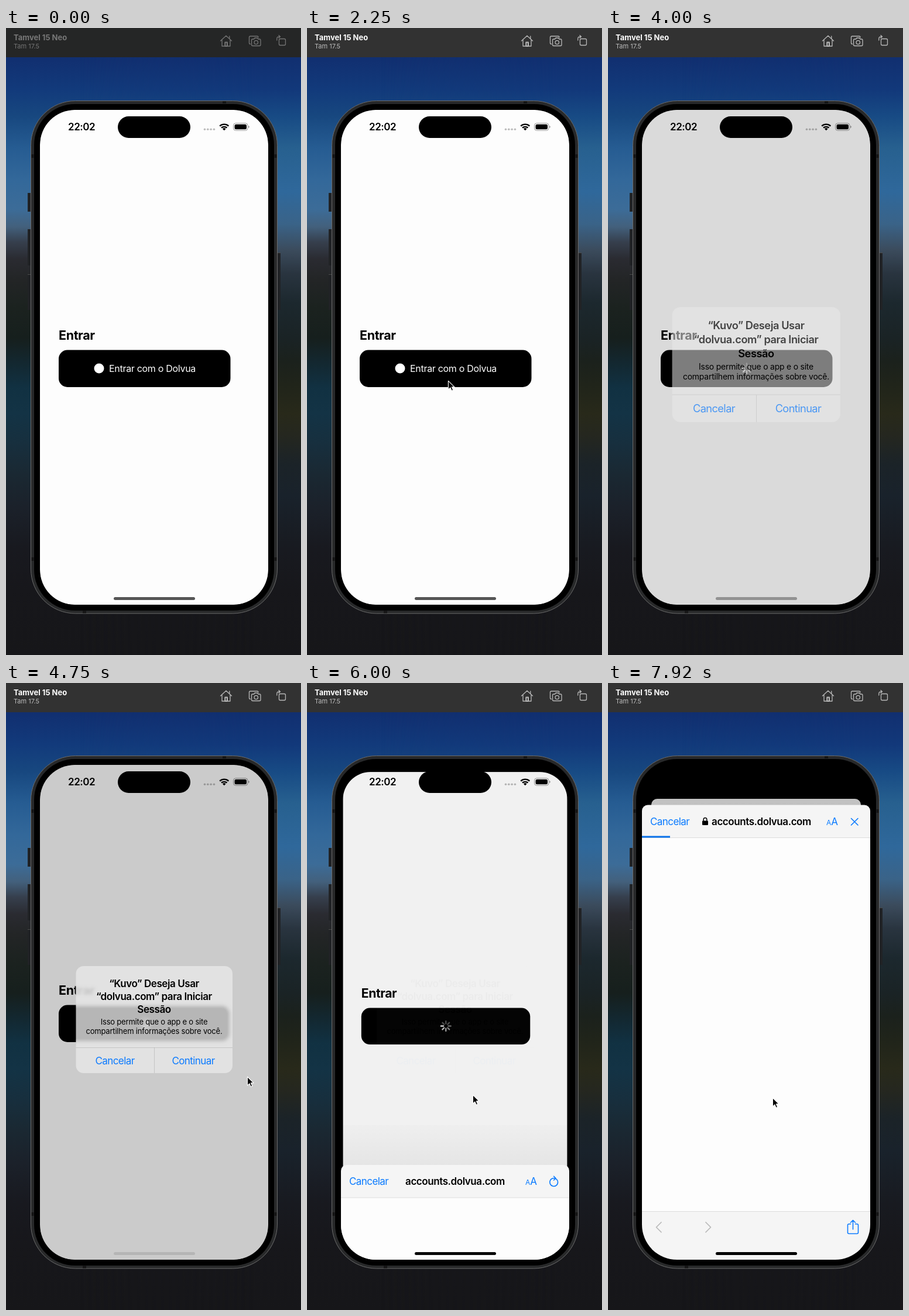
An HTML page for the animation above (8000 ms loop, 504 by 1072 pixels).

```html
<!DOCTYPE html>
<html lang="pt">
<head>
<meta charset="utf-8">
<title>Entrar</title>
<style>
  html, body { margin: 0; width: 100%; height: 100%; overflow: hidden; background: #17171b; }
  #wall, #wall::after, svg { position: absolute; inset: 0; width: 100%; height: 100%; display: block; }
  #wall {
    background: linear-gradient(#112f70 50px, #123a7b 105px, #17477f 150px, #265c92 205px, #33689a 260px,
      #3c6c98 310px, #43607c 340px, #363f4d 366px, #2a2b31 395px, #232526 430px, #1b221f 480px, #161f1d 530px,
      #13272f 570px, #113142 615px, #133345 660px, #172f3e 710px, #1a2832 765px, #1b212a 820px, #18191f 890px,
      #17171b 960px, #161619);
  }
  #wall::after {
    content: "";
    background: linear-gradient(#112f70 50px, #12387a 105px, #174a84 150px, #27608f 205px, #2f689b 280px,
      #3a6388 335px, #3b4b5c 380px, #29343f 420px, #1c282e 470px, #1a2325 530px, #1b211c 570px, #20241a 610px,
      #28291a 660px, #25271f 695px, #1b2328 745px, #19222b 800px, #181a20 890px, #17171b 960px, #161619);
    -webkit-mask-image: linear-gradient(90deg, transparent 25%, #000 85%);
    mask-image: linear-gradient(90deg, transparent 25%, #000 85%);
  }
  text { font-family: Inter, "Open Sans", sans-serif; font-size: 17px; }
  .semi { font-weight: 600; letter-spacing: -.43px; }
  .link { fill: #0a7aff; letter-spacing: -.58px; }
  .small { font-size: 13px; letter-spacing: -.2px; }
  .mid { text-anchor: middle; }
  .line { fill: none; stroke-linecap: round; stroke-linejoin: round; }
  .blue { stroke: #0a7aff; stroke-width: 1.6; }
</style>
</head>
<body>
<div id="wall"></div>
<svg viewBox="0 0 504 1072" preserveAspectRatio="none">
  <defs>
    <clipPath id="screen"><rect x="58" y="140" width="390" height="846" rx="60"/></clipPath>
    <clipPath id="panel"><rect x="119.5" y="484" width="267.5" height="183" rx="13"/></clipPath>
    <clipPath id="card"><rect id="cardRect" x="58" y="140" width="390" height="846"/></clipPath>
    <filter id="blur"><feGaussianBlur stdDeviation="2.5"/></filter>
    <linearGradient id="shade" x2="0" y2="1">
      <stop stop-opacity=".01"/><stop offset="1" stop-opacity=".055"/>
    </linearGradient>
  </defs>

  <!-- window bar -->
  <rect id="bar" width="504" height="50"/>
  <text id="device" x="13" y="21" style="font-size:13px;font-weight:700">Tamvel 15 Neo</text>
  <text id="system" x="13" y="35" style="font-size:11px">Tam 17.5</text>
  <g id="tools" class="line" stroke-width="1.3">
    <path d="M366.5 22 376 13.2 385.500 22M369 20V31H383V20M381.800 18V14"/>
    <path d="M374.300 31V24.500H378V31Z" stroke-width="2"/>
    <path d="M417.500 27.500Q415.500 27.500 415.500 25.500V16Q415.500 14 417.500 14H429Q431 14 431 16"/>
    <path d="M421.500 19H423.500L425 17H429.500L431 19H433Q435 19 435 21V28.500Q435 30.500 433 30.500H421.500Q419.500 30.500 419.500 28.500V21Q419.500 19 421.500 19Z"/>
    <circle cx="427.300" cy="24.500" r="3.200"/>
    <rect x="466.500" y="18.500" width="11" height="11" rx="2"/>
    <path d="M462.800 21V18.500Q462.800 14.800 466.500 14.800H468M466 12.500 468.500 14.800 466 17"/>
  </g>

  <!-- phone body -->
  <g fill="#202225">
    <path d="M37 282h6v32h-6zM37 344h6v62h-6zM37 421h6v61h-6zM463 384h6v98h-6z"/>
  </g>
  <path d="M37 421.500H43M463 384.500H469" stroke="#4a4a4a"/>
  <rect x="42.500" y="124.500" width="421" height="876.500" rx="76" fill="#28292a" stroke="#6a6a6a"/>
  <path d="M370 127h6M131 998.500h6M45.500 216v6M460.500 216v6M45.500 905v6M460.500 905v6" stroke="#151515" stroke-width="4"/>
  <rect x="48" y="130" width="410" height="866" rx="70"/>

  <g clip-path="url(#screen)">
    <g id="page">
      <g clip-path="url(#card)">
        <rect x="58" y="140" width="390" height="846" fill="#fdfdfd"/>
        <text x="90" y="533" style="font-size:21.5px;font-weight:700;letter-spacing:-.4px">Entrar</text>
        <rect x="90" y="550.500" width="293.500" height="63.500" rx="15"/>
        <g id="label" fill="#fff">
          <circle cx="159" cy="582" r="8.500"/>
          <text x="176" y="588" style="font-size:16px;letter-spacing:-.3px">Entrar com o Dolvua</text>
        </g>
        <g id="spinner" class="line" stroke="#fff" stroke-width="2.400"></g>
        <rect id="dim" x="58" y="140" width="390" height="846"/>
      </g>
    </g>

    <g id="status">
      <text class="semi" x="106" y="175">22:02</text>
      <g fill-opacity=".26">
        <circle cx="339.500" cy="173.200" r="1.800"/><circle cx="344.800" cy="173.200" r="1.800"/>
        <circle cx="350.100" cy="173.200" r="1.800"/><circle cx="355.400" cy="173.200" r="1.800"/>
      </g>
      <path class="line" style="stroke-linecap:butt" d="M365.200 167.600A11 11 0 0 1 380.300 167.600M368 170.700A7 7 0 0 1 377.500 170.700" stroke="#000" stroke-width="2.400"/>
      <path d="M372.750 175.200 370 172.400A4 4 0 0 1 375.500 172.400Z"/>
      <rect x="388.500" y="162.800" width="24.500" height="12.400" rx="4" fill="none" stroke="#000" stroke-opacity=".4"/>
      <rect x="390.500" y="164.800" width="20.500" height="8.400" rx="2.500"/>
      <path d="M414.200 167v4q1.600-.6 1.600-2t-1.600-2" fill-opacity=".4"/>
    </g>
    <rect x="191" y="151" width="124" height="37" rx="18.500"/>

    <g id="frost" clip-path="url(#panel)"><use href="#page" filter="url(#blur)"/></g>
    <g id="alert">
      <rect x="119.500" y="484" width="267.500" height="183" rx="13" fill="#e8e8e8" fill-opacity=".783"/>
      <path d="M119.500 623.500H387M253.500 623.500V667" stroke="#000" stroke-opacity=".13"/>
      <g class="mid">
        <text class="semi" x="253" y="519.500">“Kuvo” Deseja Usar</text>
        <text class="semi" x="253" y="541.500">“dolvua.com” para Iniciar</text>
        <text class="semi" x="253" y="563.500">Sessão</text>
        <text class="small" x="253" y="583.500">Isso permite que o app e o site</text>
        <text class="small" x="253" y="599.500">compartilhem informações sobre você.</text>
        <text class="link" x="186" y="651.500">Cancelar</text>
        <text class="link" x="320" y="651.500">Continuar</text>
      </g>
    </g>

    <g id="sheet">
      <rect x="58" y="140" width="390" height="78" fill="url(#shade)"/>
      <rect x="58" y="208.500" width="390" height="800" rx="10" fill="#f5f5f5"/>
      <rect x="58" y="264" width="390" height="640" fill="#fdfdfd"/>
      <path d="M58 264.500H448M58 903.500H448" stroke="#dcdcdc"/>
      <text class="link" x="72" y="242.500">Cancelar</text>
      <text id="site" class="semi mid" x="253" y="242.500">accounts.dolvua.com</text>
      <text x="373" y="242.500" fill="#0a7aff" style="font-size:12px">A</text>
      <text x="381.300" y="242.500" fill="#0a7aff">A</text>
      <path id="reload" class="line blue" d="M425.500 232.400A6.900 6.900 0 1 1 420.500 231.300H424.500M421.600 228 425 231.300 421.600 234.600"/>
      <g id="loading">
        <path class="line blue" d="M415.500 231.500 427 243M427 231.500 415.500 243"/>
        <rect x="161" y="235.500" width="10" height="7.500" rx="1.300"/>
        <path class="line" d="M163.200 236V233.300A2.800 2.800 0 0 1 168.800 233.300V236" stroke="#000" stroke-width="1.500"/>
        <rect id="progress" x="58" y="261.500" height="3" fill="#0a72ea"/>
      </g>
      <path class="line" d="M91 922 82.500 930.500 91 939M167 922 175.500 930.500 167 939" stroke="#b9b9b9" stroke-width="1.700"/>
      <path class="line blue" d="M414.500 925H411.500Q409.500 925 409.500 927V939.500Q409.500 941.500 411.500 941.500H425.500Q427.500 941.500 427.500 939.500V927Q427.500 925 425.500 925H422.500M418.500 934V919M414.500 922.500 418.500 918.500 422.500 922.500"/>
    </g>
    <rect id="home" x="184" y="973" width="139" height="5" rx="2.500"/>
  </g>

  <path id="cursor" d="M.4.300V15.200L3.900 11.900 6.200 17.300 8.700 16.200 6.400 10.900H11Z" stroke="#fff" stroke-width="1.100" stroke-linejoin="round"/>
</svg>
<script>
const LOOP = 8000, FPS = 12;
const ACTIVE = 1830, TAP = 2660, ALERT = 3850, ACCEPT = 5790, SHEET = 5953.5, LOAD = 7400;

// time, x, y of the pointer tip
const POINTER = [
  [400, 300, 1085], [900, 262, 700], [1500, 241, 603], [2750, 241, 603], [3300, 520, 640],
  [4450, 520, 690], [5000, 330, 660], [5300, 307, 649], [5800, 307, 649], [6000, 283, 704], [6200, 281, 709]
];
const HOME = [[3830, .66], [4000, .33], [4300, .11], [5790, .11], [6000, .97], [6080, 1]];

const el = {};
document.querySelectorAll('svg [id]').forEach(n => el[n.id] = n);
const set = (id, attrs) => { for (const k in attrs) el[id].setAttribute(k, attrs[k]); };
const show = (id, on) => set(id, { visibility: on ? 'visible' : 'hidden' });
const clamp = v => Math.min(1, Math.max(0, v));
const mix = (a, b, p) => a + (b - a) * p;

function spring(ms, rate) {
  const x = Math.max(0, ms) * rate / 1000;
  return x > 9 ? 1 : 1 - Math.exp(-x) * (1 + x);
}

function track(keys, t, i, ease = p => p) {
  if (t <= keys[0][0]) return keys[0][i];
  for (let k = 1; k < keys.length; k++) {
    const a = keys[k - 1], b = keys[k];
    if (t <= b[0]) return mix(a[i], b[i], ease((t - a[0]) / (b[0] - a[0])));
  }
  return keys[keys.length - 1][i];
}
const smooth = p => p * p * (3 - 2 * p);

for (let i = 0; i < 8; i++) {
  const spoke = document.createElementNS('http://www.w3.org/2000/svg', 'path');
  spoke.setAttribute('d', 'M237 577.700V573.500');
  spoke.setAttribute('transform', `rotate(${i * 45} 237 582)`);
  el.spinner.append(spoke);
}

function drawBar(active) {
  set('bar', { fill: active ? '#323232' : '#252626' });
  set('device', { fill: active ? '#fff' : '#777' });
  set('system', { fill: active ? '#bcbcbc' : '#747474' });
  set('tools', { stroke: active ? '#b9b9b9' : '#747474' });
}

function drawSpinner(t) {
  const head = Math.floor(t / 125) + 6;
  [...el.spinner.children].forEach((s, i) => {
    const age = (((head - i) % 8) + 8) % 8;
    s.setAttribute('stroke-opacity', mix(.85, .3, Math.min(age, 5) / 5));
  });
}

function draw(t) {
  drawBar(t >= ACTIVE);
  show('label', t < TAP);
  show('spinner', t >= TAP);
  drawSpinner(t);

  const enter = spring(t - ALERT, 16);
  const alpha = enter * clamp((ACCEPT + 214 - t) / 214);
  const size = 1 + .24 * (1 - enter);
  set('alert', {
    opacity: alpha,
    transform: `translate(253.25 575.5) scale(${size}) translate(-253.25 -575.5)`
  });
  set('frost', { opacity: clamp((alpha - .75) / .25) });

  const rise = spring(t - SHEET, 18.26);
  const scale = mix(1, .918, rise);
  set('page', { transform: `translate(253 ${mix(140, 198, rise)}) scale(${scale}) translate(-253 -140)` });
  set('cardRect', { rx: mix(58, 11, rise) });
  set('dim', { 'fill-opacity': .2 * Math.min(1, alpha + rise) });
  set('status', { opacity: clamp(1.3 - rise * 1.3) });
  set('sheet', { transform: `translate(0 ${778 * (1 - rise)})` });
  show('sheet', t >= SHEET);
  set('home', { 'fill-opacity': track(HOME, t, 1) });

  const load = t >= LOAD;
  set('site', { x: load ? 262 : 253 });
  show('reload', !load && t >= SHEET);
  show('loading', load);
  set('progress', { width: 48 * smooth(clamp((t - LOAD) / 500)) });

  const x = track(POINTER, t, 1, smooth), y = track(POINTER, t, 2, smooth);
  set('cursor', { transform: `translate(${x} ${y})` });
}

const start = performance.now();
function tick() {
  const t = (performance.now() - start) % LOOP;
  draw(Math.floor((t + 3.5) * FPS / 1000) * 1000 / FPS);
  requestAnimationFrame(tick);
}
draw(0);
requestAnimationFrame(tick);
</script>
</body>
</html>
```
